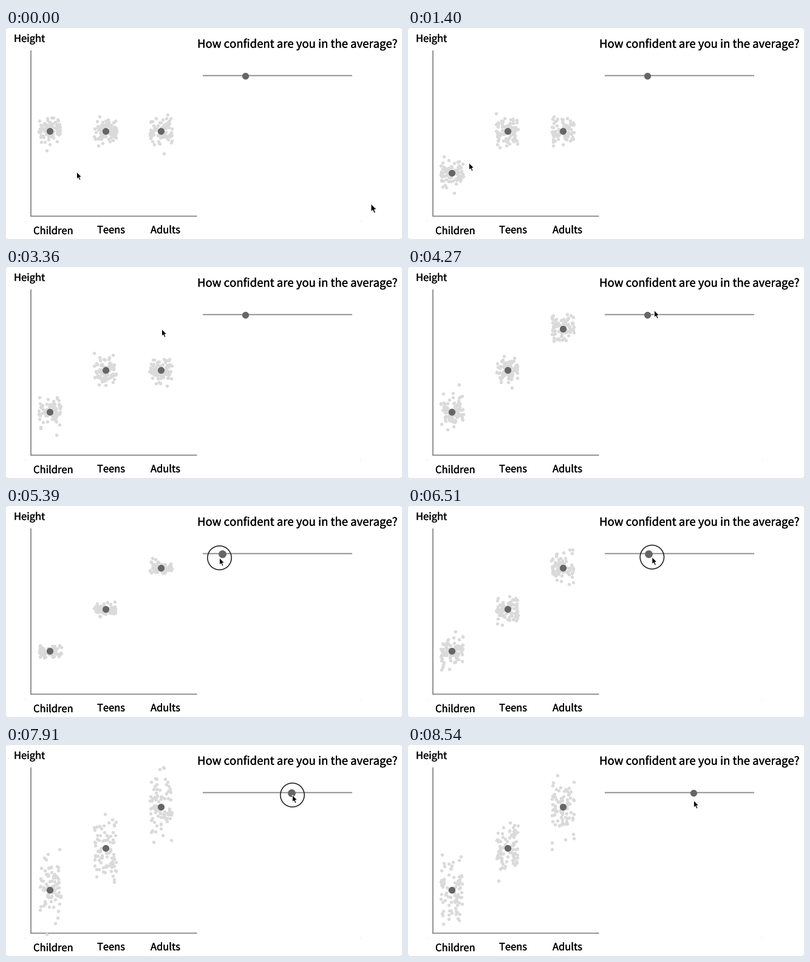
A matplotlib script for the animation above (8.61 s loop, 652x348 px).

```python
import numpy as np
import matplotlib.pyplot as plt
from matplotlib.animation import FuncAnimation
from matplotlib.patches import Circle, FancyBboxPatch, Polygon
from matplotlib.patheffects import withStroke

W, H, DPI = 652, 348, 64
PX = 72 / DPI                     # points per pixel
FRAMES, STEP = 123, 70
DARK, LIGHT, LINE = "#666666", "#dadada", "#868686"

CENTERS = 72.2 + 91.3 * np.arange(3)
MID, SHIFT = 170, 68.5            # middle height, distance of a moved mean
SLIDER_X, SLIDER_Y = (324, 570), 78.5
KNOB_START = 394
N_DOTS = 84

CLICKS = ((11, 18), (50, 52))     # child mean down, adult mean up
DRAG = (65, 118)                  # slider drag

# Pointer moves: first frame, last frame, end point
START = (116, 237)
MOVES = (
    (0, 11, (69, 238)), (19, 20, (100, 222)), (20, 31, (164, 171)),
    (31, 38, (278, 168)), (38, 47, (256, 102)), (51, 61, (405, 71)),
    (61, 64, (395, 82)), (67, 77, (351, 85)), (80, 111, (471, 82)),
    (118, 122, (470, 91)))
ARROW = np.array([(0, 0), (0, 11.6), (2.6, 9.3), (4.6, 13.7),
                  (6.6, 12.8), (4.7, 8.5), (8.2, 8.3)])


def pointer(f):
    pos = np.array(START, float)
    for a, b, end in MOVES:
        pos += (np.array(end) - pos) * np.clip((f - a) / (b - a), 0, 1)
    return pos


def within(f, span):
    return span[0] <= f <= span[1]


def knob_x(f):
    # The knob trails the pointer slightly
    if f < DRAG[0]:
        return KNOB_START
    return pointer(min(f, DRAG[1]) - 1.33)[0] - 0.6


def means(f):
    child, adult = (f > start for start, _ in CLICKS)
    return MID + SHIFT * np.array((child, 0, -float(adult)))


def cloud(f):
    # New samples on two frames out of three
    rng = np.random.default_rng(500 + (2 * f + 2) // 3)
    spread = 0.16 * (knob_x(f) - SLIDER_X[0])
    dx = rng.uniform(-18.5, 18.5, (3, N_DOTS))
    dy = rng.normal(0, spread, (3, N_DOTS))
    x = CENTERS[:, None] + dx
    y = means(f)[:, None] + dy
    return np.column_stack((x.ravel(), y.ravel()))


fig = plt.figure(figsize=(W / DPI, H / DPI), dpi=DPI, facecolor="#d0d0d0")
ax = fig.add_axes((0, 0, 1, 1))
ax.set(xlim=(0, W), ylim=(H, 0))
ax.axis("off")


def line(xs, ys):
    ax.plot(xs, ys, color=LINE, lw=1.8 * PX, solid_capstyle="butt",
            snap=False, zorder=2)


def label(x, y, text, size=16.5):
    ax.text(x, y, text, fontsize=size * PX, family="Noto Sans CJK JP",
            color="black", va="baseline", ha="left", zorder=2,
            path_effects=[withStroke(linewidth=0.3 * PX, foreground="black")])


def area(size):
    return (size * PX) ** 2


def dots(size, color, z):
    return ax.scatter([], [], s=area(size), c=color, lw=0, zorder=z,
                      snap=False)


def arrow():
    return ax.add_patch(Polygon(ARROW, fc="black", ec="white",
                                lw=0.9 * PX, zorder=9))


ax.add_patch(FancyBboxPatch((0, 0), W, H, fc="white", ec="none", zorder=0,
                            boxstyle="round,pad=0,rounding_size=3"))
line((41, 41), (37, 311))
line((40.2, 314.5), (310.4, 310.4))
line(SLIDER_X, (SLIDER_Y, SLIDER_Y))
ax.scatter((30.5, 30.5, 582.5), (31.5, 317.5, 317.5), s=1.2, c="#cccccc",
           lw=0, zorder=1)

label(13, 23, "Height")
label(315, 32.5, "How confident are you in the average?", 18.5)
label(45, 340, "Children")
label(150, 338.5, "Teens")
label(238, 338.5, "Adults")

sample = dots(5.4, LIGHT, 3)
marks = dots(11.2, DARK, 4)
knob = dots(11.2, DARK, 4)
ring = ax.add_patch(Circle((0, 0), 19.7, fill=False, ec="#151515",
                           lw=1.5 * PX, zorder=6))
hand, spare = arrow(), arrow()


def update(f):
    tip = pointer(f) + 0.5
    dragging = within(f, DRAG)
    sample.set_offsets(cloud(f))
    marks.set_offsets(np.column_stack((CENTERS, means(f))))
    knob.set_offsets([(knob_x(f), SLIDER_Y)])
    knob.set_sizes([area(12.8 if dragging else 11.2)])
    ring.center = tuple(tip)
    ring.set_visible(dragging or any(within(f, c) for c in CLICKS))
    hand.set_xy(ARROW + tip)
    # Second pointer slides off to the right
    spare.set_xy(ARROW * 1.12 + (601 + 4.3 * f, 290))
    return sample, marks, knob, ring, hand, spare


anim = FuncAnimation(fig, update, frames=FRAMES, interval=STEP,
                     repeat=True, repeat_delay=0, blit=False)
plt.show()
```
